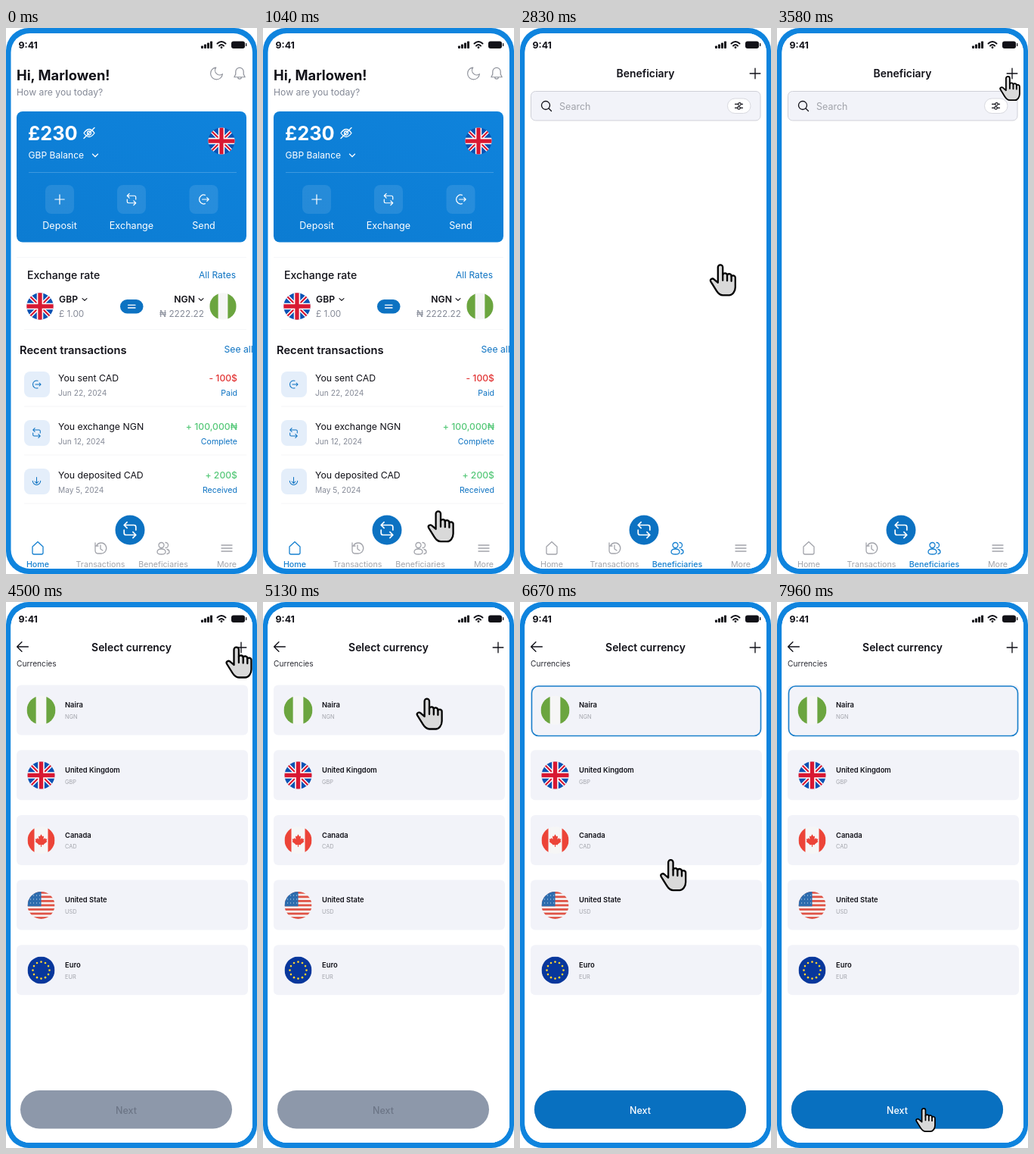
Animation, 332 px wide and 720 px high, one loop 8 s. Source, as an HTML page:

```html
<!DOCTYPE html>
<html lang="en">
<head>
<meta charset="utf-8">
<title>Wallet app walkthrough</title>
<style>
  html, body { margin: 0; width: 100%; height: 100%; overflow: hidden; background: #fff; }
  svg { display: block; width: 100vw; height: 100vh; }
  text { font-family: Inter, "DejaVu Sans", sans-serif; }
  .line { fill: none; stroke-width: 1.3; stroke-linecap: round; stroke-linejoin: round; }
</style>
</head>
<body>
<svg id="stage" viewBox="0 0 332 720" xmlns="http://www.w3.org/2000/svg"></svg>
<script>
const BLUE = '#0c72c2', INK = '#111118', GRAY = '#858a97', PALE = '#a2a4ab';

// Drawing helpers
const text = (x, y, size, fill, str, weight = 400, anchor = 'start') =>
  `<text x="${x}" y="${y}" font-size="${size}" fill="${fill}" font-weight="${weight}" text-anchor="${anchor}">${str}</text>`;
const rect = (x, y, w, h, r, fill, extra = '') =>
  `<rect x="${x}" y="${y}" width="${w}" height="${h}" rx="${r}" fill="${fill}" ${extra}/>`;
const circle = (x, y, r, fill) => `<circle cx="${x}" cy="${y}" r="${r}" fill="${fill}"/>`;
const line = (d, color, width = 1.3) => `<path class="line" d="${d}" stroke="${color}" style="stroke-width:${width}"/>`;
const icon = (name, x, y, color, scale = 1) =>
  `<g transform="translate(${x} ${y}) scale(${scale})">${line(icons[name], color)}</g>`;
const repeat = (n, make) => Array.from({ length: n }, (_, i) => make(i)).join('');

// Icon paths, centred on the origin
const icons = {
  plus: 'M-6.5 0H6.5M0-6.5V6.5',
  swap: 'M-3-8-6-5-3-2M-6-5H4Q6-5 6-3V0M3 2 6 5 3 8M6 5H-4Q-6 5-6 3V0',
  send: 'M2-6A6.3 6.3 0 1 0 2 6M-2 0H7M4.5-2.5 7 0 4.5 2.5',
  deposit: 'M-6.5-1A6.5 6.5 0 1 0 6.5-1M0-7V2.5M-3 0 0 3 3 0',
  chevron: 'M-3.5-1.7 0 1.7 3.5-1.7',
  eye: 'M-7 0Q-3.5-5 0-5T7 0Q3.5 5 0 5T-7 0ZM-2.5 0A2.5 2.5 0 1 0 2.5 0A2.5 2.5 0 1 0-2.5 0M7-7-7 7',
  moon: 'M9 .8A9 9 0 1 1-.8-9A7 7 0 0 0 9 .8Z',
  bell: 'M0-8A5.5 5.5 0 0 0-5.5-2.5V1L-7.5 5H7.5L5.5 1V-2.5A5.5 5.5 0 0 0 0-8ZM-2.5 5A2.5 2.5 0 0 0 2.5 5',
  home: 'M-7-2 0-8.5 7-2V6Q7 8 5 8H-5Q-7 8-7 6Z',
  history: 'M-7-5V3Q-7 7-3 7H1A7 7 0 1 0-5-4M-7-7V-3H-3M0-4V1L3 3',
  people: 'M-6-4A3.5 3.5 0 1 0 1-4A3.5 3.5 0 1 0-6-4M3-7.5A3.5 3.5 0 0 1 3-.5M-8 5Q-8 1-2.5 1T3 5Q3 8-2.5 8T-8 5M5 1.5Q8 2 8 5 8 7 5 7.5',
  more: 'M-7-4H7M-7 0H7M-7 4H7',
  search: 'M-6.5-1A5.5 5.5 0 1 0 4.5-1A5.5 5.5 0 1 0-6.5-1M3 3 6.5 6.5',
  sliders: 'M-5.5-2.5H-1M3-2.5H5.5M-1-2.5A2 2 0 1 0 3-2.5A2 2 0 1 0-1-2.5M-5.5 3H-2M2 3H5.5M-2 3A2 2 0 1 0 2 3A2 2 0 1 0-2 3',
  back: 'M7 0H-7M-1-6-7 0-1 6',
};

// Flags fill a circle of radius 18
const field = color => rect(-18, -18, 36, 36, 0, color);
const sides = (color, width) => field('#f6f6f6') +
  rect(-18, -18, width, 36, 0, color) + rect(18 - width, -18, width, 36, 0, color);
const diagonals = 'M-14-14 14 14M14-14-14 14', cross = 'M0-18V18M-18 0H18';
const flags = {
  uk: field('#0a52b4') + line(diagonals, '#fff', 5) + line(diagonals, '#d81832', 2.2) +
    line(cross, '#fff', 8.6) + line(cross, '#d81832', 5.4),
  nigeria: sides('#6ba53f', 11.5),
  canada: sides('#ec4438', 9) +
    '<path fill="#ec4438" transform="scale(.88)" d="M0-9 2-5.500 4-6.500 3.500-1.500 6-3.500 6.500-2 9-2 8 1 9 2 4 6 4 7H.6V10H-.6V7H-4V6L-9 2-8 1-9-2-6.500-2-6-3.500-3.500-1.500-4-6.500-2-5.500Z"/>',
  us: field('#f6f2f1') + repeat(7, i => rect(-18, -18 + i * 5.54, 36, 2.77, 0, '#df5346')) +
    rect(-18, -18, 18, 19.4, 0, '#2d6cae') +
    repeat(12, i => circle(-14 + i % 4 * 4, -13 + Math.floor(i / 4) * 5, .6, '#c9d9ea')),
  euro: field('#08379c') +
    repeat(12, i => circle(11 * Math.sin(i * Math.PI / 6), 11 * Math.cos(i * Math.PI / 6), 1.3, '#ffd42e')),
};
const flag = (name, x, y, r) =>
  `<g transform="translate(${x} ${y}) scale(${r / 18})" clip-path="url(#disc)">${flags[name]}</g>`;

const statusBar = text(16.5, 27, 12.4, INK, '9:41', 700) +
  repeat(4, i => rect(258 + i * 4, 23.5 - i * 2, 3, 3.5 + i * 2, .8, INK)) +
  line('M279.500 20.500Q285 15.500 290.500 20.500M282 23.500Q285 20.500 288 23.500', INK, 2) + circle(285, 25.7, 1.4, INK) +
  rect(298, 17.5, 18, 9.5, 3, INK) + rect(317, 20, 1.3, 4, .6, INK);

const tabs = [['home', 'Home', 42], ['history', 'Transactions', 125], ['people', 'Beneficiaries', 208], ['more', 'More', 292]];
const navBar = active => circle(164, 662, 19.5, BLUE) + icon('swap', 164, 662, '#fff', 1.3) +
  tabs.map(([name, label, x], i) => {
    const color = i === active ? '#1680d0' : PALE;
    return icon(name, x, 686, color) + text(x, 710.5, 10.7, color, label, i === active ? 500 : 400, 'middle');
  }).join('');

const action = (name, label, x) => rect(x - 19, 207, 38, 38, 8, '#fff', 'fill-opacity=".1"') +
  icon(name, x, 226, '#fff', .95) + text(x, 265, 12.6, '#fff', label, 400, 'middle');

const transaction = (y, name, title, date, amount, color, state) =>
  rect(24, y - 17, 34, 34, 8, '#e4eefa') + icon(name, 40.5, y, BLUE, .8) +
  text(69, y - 4, 12.3, INK, title) + text(69, y + 15, 10.2, GRAY, date) +
  text(306, y - 4, 12.2, color, amount, 500, 'end') + text(306, y + 15, 10.6, BLUE, state, 400, 'end') +
  rect(24, y + 28.5, 294, 1, 0, '#f5f6f8');

const homeScreen = text(14, 69, 18.3, INK, 'Hi, Marlowen!', 700) + text(14, 89, 12.2, GRAY, 'How are you today?') +
  icon('moon', 278.5, 60, '#8f929b', .88) + icon('bell', 309, 60, '#8f929b', .95) +
  rect(14, 110, 304, 172.5, 8, 'url(#card)') +
  text(29, 148, 25.4, '#fff', '£230', 700) + icon('eye', 110, 138.5, '#fff') +
  text(29.5, 172, 12.1, '#fff', 'GBP Balance') + icon('chevron', 118, 168, '#fff') +
  rect(30, 190, 275, 1, 0, '#fff', 'fill-opacity=".2"') + flag('uk', 285, 149, 17.5) +
  action('plus', 'Deposit', 71) + action('swap', 'Exchange', 166) + action('send', 'Send', 261.5) +
  rect(14, 302, 304, 1, 0, '#f6f7f9') + rect(24, 397, 294, 1, 0, '#f6f7f9') +
  text(28, 331, 14.1, INK, 'Exchange rate', 500) + text(304, 330, 12, BLUE, 'All Rates', 400, 'end') +
  flag('uk', 45, 367, 17.7) + text(70, 362, 12.2, INK, 'GBP', 600) + icon('chevron', 104, 358, INK, .85) +
  text(70, 381, 11.8, GRAY, '£ 1.00') +
  rect(151, 358, 30.5, 18.5, 9.2, BLUE) + line('M161.500 365.300H171M161.500 369H171', '#fff') +
  text(250, 362, 12.2, INK, 'NGN', 600, 'end') + icon('chevron', 258, 358, INK, .85) +
  text(262, 381, 11.8, GRAY, '₦ 2222.22', 400, 'end') + flag('nigeria', 287, 367, 17.7) +
  text(18, 430, 14.7, INK, 'Recent transactions', 600) + text(288.5, 427.5, 12.2, BLUE, 'See all') +
  transaction(470, 'send', 'You sent CAD', 'Jun 22, 2024', '- 100$', '#e23434', 'Paid') +
  transaction(534, 'swap', 'You exchange NGN', 'Jun 12, 2024', '+ 100,000₦', '#55c878', 'Complete') +
  transaction(598, 'deposit', 'You deposited CAD', 'May 5, 2024', '+ 200$', '#55c878', 'Received') +
  navBar(0);

const header = title => text(166, 65, 13.9, INK, title, 600, 'middle') + icon('plus', 311, 60, INK, 1.05);

const beneficiaryScreen = header('Beneficiary') +
  rect(14.5, 83.5, 303.5, 38.5, 6, '#f2f3f9', 'stroke="#cfd0d8"') +
  icon('search', 35, 103, INK) + text(52, 108, 12.5, PALE, 'Search') +
  rect(274.5, 93, 30.5, 19.5, 9.7, '#fff', 'stroke="#d8d9df"') + icon('sliders', 289.5, 102.7, INK, .9) +
  navBar(2);

const currencies = [['nigeria', 'Naira', 'NGN'], ['uk', 'United Kingdom', 'GBP'], ['canada', 'Canada', 'CAD'],
  ['us', 'United State', 'USD'], ['euro', 'Euro', 'EUR']];
const button = (fill, color) => rect(19, 644, 280, 50.5, 25.2, fill) + text(159, 675, 12.5, color, 'Next', 500, 'middle');

const currencyScreen = header('Select currency') + icon('back', 22, 59, INK, 1.05) +
  text(14, 85, 10.2, '#2c2d35', 'Currencies') +
  currencies.map(([name, label, code], i) => {
    const y = 109.5 + i * 85.7;
    return rect(14, y, 306, 66, 6, '#f2f3f9') + flag(name, 46.5, y + 33.3, i ? 18 : 19) +
      text(78, y + 29.7, 9.4, INK, label, 600) + text(78, y + 44.5, 7.4, PALE, code);
  }).join('') + button('#8d98aa', '#6c7586');

const selection = rect(15.5, 111, 303, 65.5, 9, 'none', 'stroke="#1a7fcb" stroke-width="1.6"') + button('#0870c0', '#fff');

const hand = `<g transform="translate(-18 -21.500)" stroke="#000" stroke-width="2.300" stroke-linejoin="round" stroke-linecap="round">
  <path fill="#d9d9d9" d="M11.500 25V4.800a3.200 3.200 0 0 1 6.400 0V14.500a3 3 0 0 1 5.800 .5a3 3 0 0 1 5.600 1.800a2.900 2.900 0 0 1 5.200 2V31c0 6-4 10.500-8 10.500H18c-4 0-6-2-8.500-6L2 23.500c-1.500-3 2-5 4.500-2.800z"/>
  <path fill="none" d="M17.900 14.500v7.500M23.700 15.500v7M29.300 17v6"/></g>`;

const layer = (id, content) => `<g id="${id}">${content}</g>`;
const screen = content => rect(0, 0, 332, 720, 0, '#fff') + statusBar + content;

document.getElementById('stage').innerHTML = `<defs>
  <clipPath id="disc"><circle r="18"/></clipPath>
  <clipPath id="glass"><rect x="6.500" y="7" width="319.500" height="706" rx="25"/></clipPath>
  <linearGradient id="card" x1="0" y1="1" x2="1" y2="0"><stop stop-color="#0c7cd2"/><stop offset="1" stop-color="#0f83dc"/></linearGradient>
  </defs>` + rect(0, 0, 332, 720, 30, '#0f84de') +
  `<g clip-path="url(#glass)">${screen(homeScreen)}${layer('beneficiary', screen(beneficiaryScreen))}${
    layer('currency', screen(currencyScreen))}${layer('selected', selection)}${layer('cursor', hand)}</g>`;

// Each cycle: glide to a stop, press, release, fade in the next layer
const LOOP = 8000, GLIDE = 840;
const starts = [500, 2483, 4545, 6460];
const stops = [[350, 455], [210.5, 700.5], [308, 79.5], [206.5, 158], [196.5, 683]];
const layers = ['beneficiary', 'currency', 'selected'].map(id => document.getElementById(id));
const cursor = document.getElementById('cursor');

const ramp = (t, from, to) => Math.min(1, Math.max(0, (t - from) / (to - from)));
const easeOut = p => 1 - (1 - p) ** 1.68;

function draw(t) {
  layers.forEach((el, i) => {
    const opacity = easeOut(ramp(t - starts[i], 1650, 1950));
    el.setAttribute('opacity', opacity);
    el.setAttribute('visibility', opacity ? 'visible' : 'hidden');
  });
  const cycle = Math.max(0, starts.filter(start => t >= start).length - 1);
  const since = t - starts[cycle];
  const glide = easeOut(ramp(since, 0, GLIDE));
  const [x, y] = stops[cycle].map((from, axis) => from + (stops[cycle + 1][axis] - from) * glide);
  const scale = 1 - .27 * (easeOut(ramp(since, 850, 1250)) - ramp(since, 1480, 1690));
  cursor.setAttribute('transform', `translate(${x} ${y}) scale(${scale})`);
}

const begin = performance.now();
function tick() {
  draw((performance.now() - begin) % LOOP);
  requestAnimationFrame(tick);
}
tick();
</script>
</body>
</html>
```
